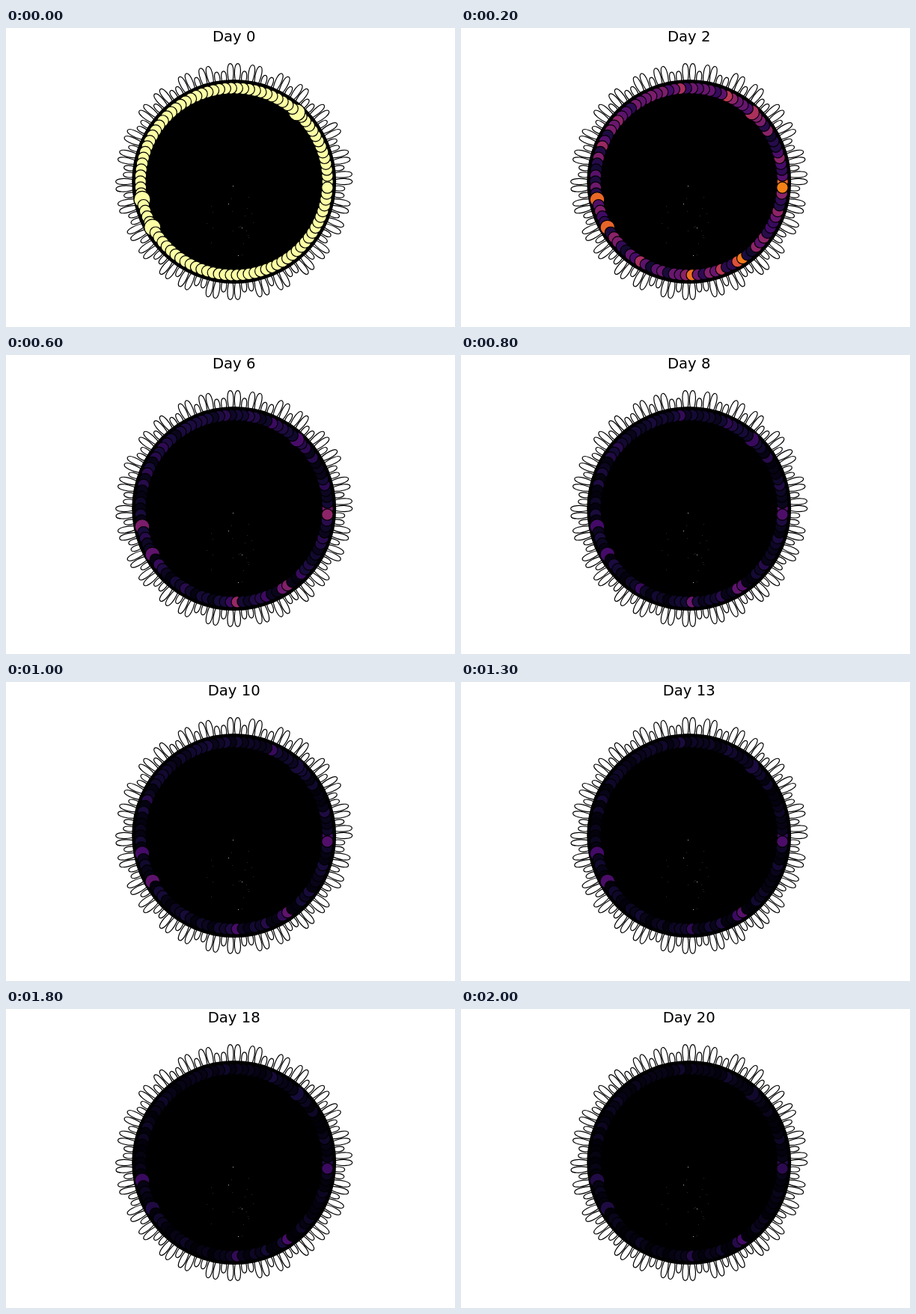
Recreate the animation shown at these times as an HTML page with a canvas. Size 600 px wide and 400 px high, loop 2100 ms.

```html
<!DOCTYPE html>
<html>
<head>
<meta charset="utf-8">
<style>
html, body { margin: 0; width: 100%; height: 100%; overflow: hidden; background: #fff; }
canvas { display: block; }
</style>
</head>
<body>
<canvas width="600" height="400"></canvas>
<script>
const ctx = document.querySelector('canvas').getContext('2d');
const N = 98, CX = 304.7, CY = 205.5, R = 125, DAYS = 21, STEP = 100;

// Inferno colour ramp in steps of 0.1
const ramp = ['000004', '160b39', '420a68', '6a176e', '932667', 'bc3754',
  'dd513a', 'f37819', 'fca50a', 'f6d746', 'fcffa4']
  .map(h => [0, 2, 4].map(k => parseInt(h.slice(k, k + 2), 16)));

function inferno(v) {
  const x = v * 10, k = Math.min(9, Math.floor(x));
  return `rgb(${ramp[k].map((c, j) => Math.round(c + (ramp[k + 1][j] - c) * (x - k)))})`;
}

let seed = 11;
const random = () => (seed = seed * 16807 % 2147483647) / 2147483647;

// Strongest nodes and their level on day 2
const strong = {
  0: .65, 13: .46, 18: .5, 26: .45, 43: .42, 52: .66, 57: .65,
  65: .45, 74: .68, 79: .5, 82: .6, 83: .7, 97: .72
};
const large = [13, 52, 57];

const nodes = Array.from({ length: N }, (_, i) => {
  const a = i / N * 2 * Math.PI;
  return {
    a, x: CX + R * Math.cos(a), y: CY - R * Math.sin(a),
    long: (i + .5) % 3.5 < 2,
    large: large.includes(i),
    base: strong[i] || .07 + .32 * random(),
    jitter: Array.from({ length: DAYS }, () => .75 + .5 * random())
  };
});

const specks = Array.from({ length: 20 }, () => [265 + 75 * random(), 225 + 80 * random()]);

// Full on day 0, then a power-law decay that is slower for strong nodes
function level({ base, jitter }, day) {
  if (!day) return 1;
  const wobble = day > 2 ? jitter[day] : 1;
  return Math.min(1, base * (2 / day) ** (1.1 - .65 * base) * wobble);
}

function petal({ a, x, y, long }) {
  const len = long ? 44 : 31, w = long ? 14 : 12;
  ctx.save();
  ctx.translate(x, y);
  ctx.rotate(-a);
  ctx.beginPath();
  ctx.moveTo(0, 0);
  ctx.bezierCurveTo(len, w, len, -w, 0, 0);
  ctx.stroke();
  ctx.restore();
}

function disc(x, y, r, fill) {
  ctx.beginPath();
  ctx.arc(x, y, r, 0, 2 * Math.PI);
  ctx.fillStyle = fill;
  ctx.fill();
}

function dots(points, fill) {
  ctx.fillStyle = fill;
  for (const [x, y] of points) ctx.fillRect(Math.round(x), Math.round(y), 1, 1);
}

function draw(day) {
  ctx.fillStyle = '#fff';
  ctx.fillRect(0, 0, 600, 400);
  ctx.strokeStyle = '#000';
  ctx.lineWidth = 1.2;
  nodes.forEach(petal);
  disc(CX, CY, 136.5, '#000');

  // Tiny gaps left between the dense links
  dots(specks, '#2a2a2a');
  dots([[303, 211], [297, 235], [315, 267], [310, 304]], '#bbb');

  for (const node of nodes) {
    const r = node.large ? (day ? 9.8 : 11) : 7.7;
    disc(node.x, node.y, r, inferno(level(node, day)));
    ctx.stroke();
  }

  ctx.fillStyle = '#000';
  ctx.font = '19.6px "DejaVu Sans", Verdana, sans-serif';
  ctx.textAlign = 'center';
  ctx.fillText('Day ' + day, CX, 18);
}

const start = performance.now();
function tick() {
  draw(Math.floor((performance.now() - start) / STEP) % DAYS);
  requestAnimationFrame(tick);
}
tick();
</script>
</body>
</html>
```
